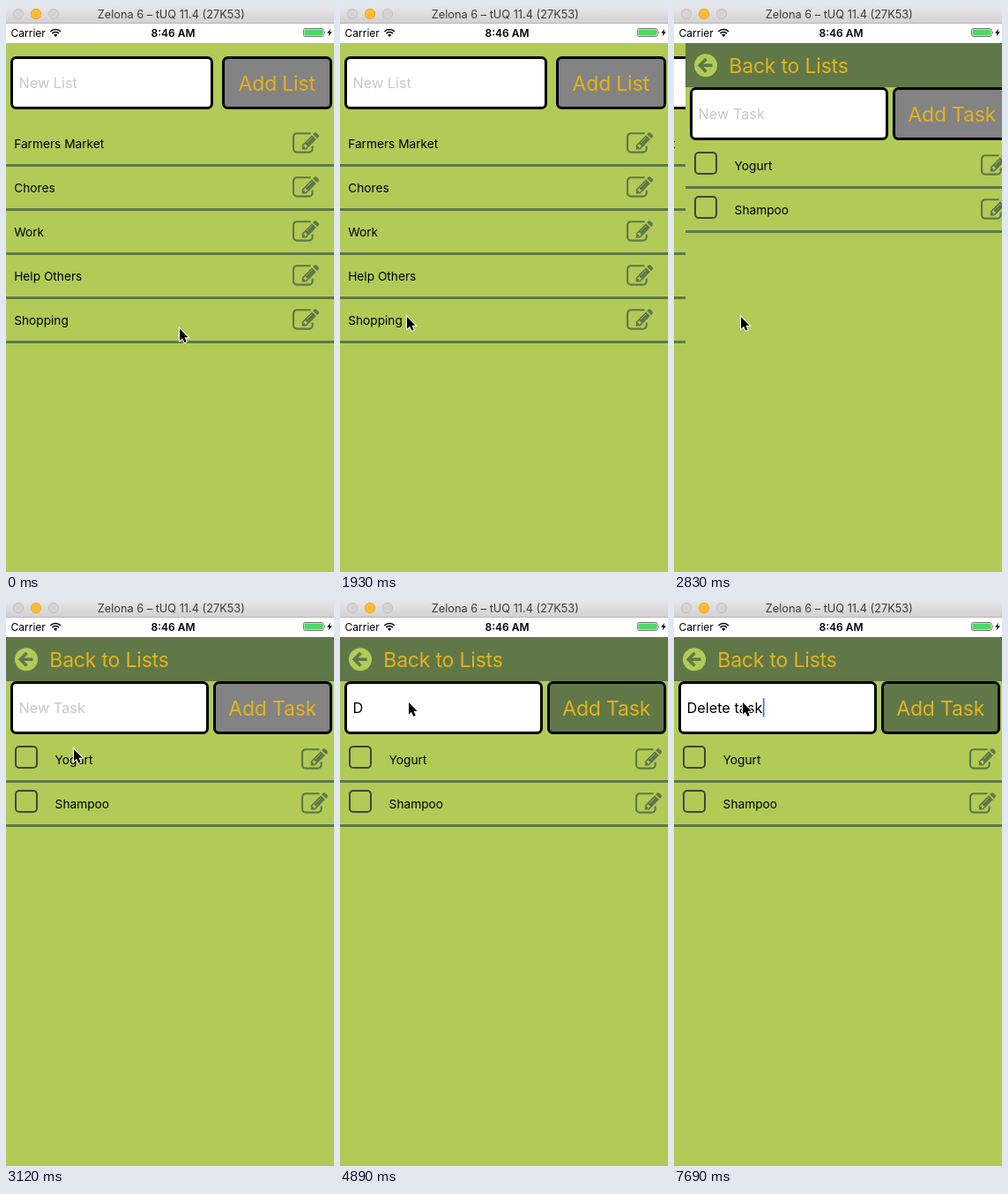
Write an HTML page that moves like this. It is 372 px wide and 641 px high and loops after 8 s.

```html
<!DOCTYPE html>
<html lang="en">
<head>
<meta charset="utf-8">
<title>To-do lists</title>
<style>
  html, body { margin: 0; width: 100%; height: 100%; overflow: hidden; background: #b2cb57; }
  svg { display: block; width: 372px; height: 641px; }
  text { font-family: Inter, Roboto, "Liberation Sans", sans-serif; white-space: pre; }
  .row { font-size: 13.7px; }
  .field { font-size: 16.3px; }
  .hint { fill: #c7c7cd; }
  .big { font-size: 23px; letter-spacing: -.2px; fill: #e3b31c; }
  .box { stroke: #000; stroke-width: 3; }
</style>
</head>
<body>
<svg viewBox="0 0 372 641">
  <defs>
    <linearGradient id="bar" x2="0" y2="1">
      <stop stop-color="#e8e6e8"/><stop offset="1" stop-color="#d2d0d2"/>
    </linearGradient>
    <clipPath id="stage"><rect y="42" width="372" height="599"/></clipPath>
    <g id="edit" fill="#607848">
      <path d="M20.5 1.2H5a4 4 0 0 0-4 4V18.6a4 4 0 0 0 4 4H18.6a4 4 0 0 0 4-4V15.6" fill="none" stroke="#607848" stroke-width="2.15"/>
      <path fill-rule="evenodd" d="M22 3.2L26.9 8.1 15.6 19.4H10.75V14.5ZM14.9 17.7L16.9 15.8 14.3 13.2 12.4 15.2V16.1H14V17.7Z"/>
      <path d="M23.1 2.15L27.95 7 29.5 5.4q.9-1.1 0-2.3L27 .6q-1.1-.9-2.3 0Z"/>
      <path d="M22 6L16 12" stroke="#b2cb57" stroke-width=".7"/>
    </g>
  </defs>
  <rect width="372" height="641" fill="#b2cb57"/>

  <g clip-path="url(#stage)">
    <g id="lists">
      <rect class="box" x="6.5" y="58.5" width="227" height="57" rx="5" fill="#fff"/>
      <text class="field hint" x="14.5" y="92.5">New List</text>
      <rect class="box" x="246.5" y="58.5" width="122" height="57" rx="5" fill="#838383"/>
      <text class="big" x="307.2" y="96" text-anchor="middle">Add List</text>
    </g>
    <g id="tasks">
      <rect y="42" width="372" height="599" fill="#b2cb57"/>
      <rect y="42" width="372" height="50" fill="#607848"/>
      <circle cx="23" cy="67.3" r="13" fill="#b2cb57"/>
      <path d="M23.5 60L16.2 67.3 23.5 74.6M17 67.3H30.5" fill="none" stroke="#607848" stroke-width="3.6"/>
      <text class="big" x="49.3" y="76">Back to Lists</text>
      <rect class="box" x="6.5" y="93.5" width="222" height="57" rx="5" fill="#fff"/>
      <text id="entry" class="field" x="14.5" y="127.5"></text>
      <rect id="caret" y="111" width="1.7" height="21.5" fill="#426bf2"/>
      <rect id="add" class="box" x="236.5" y="93.5" width="132" height="57" rx="5"/>
      <text class="big" x="302.2" y="131" text-anchor="middle">Add Task</text>
    </g>
  </g>

  <rect width="372" height="20" fill="url(#bar)"/>
  <rect y="19" width="372" height="1" fill="#b9b7b9"/>
  <g stroke-width=".8">
    <circle cx="14" cy="9" r="5.7" fill="#d5d3d5" stroke="#bebcbe"/>
    <circle cx="34" cy="9" r="5.7" fill="#ffbd2e" stroke="#e0a028"/>
    <circle cx="54" cy="9" r="5.7" fill="#d5d3d5" stroke="#bebcbe"/>
  </g>
  <text x="187.3" y="14" font-size="12.75" text-anchor="middle" fill="#3c3b3c">Zelona 6 – tUQ 11.4 (27K53)</text>

  <rect y="20" width="372" height="22" fill="#fff"/>
  <text x="5.6" y="34.6" font-size="12">Carrier</text>
  <path d="M50.4 28.9a8 8 0 0 1 11.6 0M52.5 31.1a5.2 5.2 0 0 1 7.4 0" fill="none" stroke="#000" stroke-width="1.5"/>
  <path d="M56.2 35l-2.1-2.2a3 3 0 0 1 4.2 0Z"/>
  <text x="189.5" y="34.6" font-size="12" font-weight="600" text-anchor="middle">8:46 AM</text>
  <rect x="337.5" y="25.5" width="22.5" height="9" rx="1.8" fill="#fff" stroke="#555" stroke-width=".8"/>
  <rect x="338.5" y="26.5" width="20.5" height="7" rx="1" fill="#4cd964"/>
  <path d="M361 28.2q1.8 1.8 0 3.6Z" fill="#555"/>
  <path d="M368 25.8L364.2 30.8H366.6L365.6 34.6 369.8 29.2H367.2Z"/>

  <path id="mouse" d="M0 0V13.5L3.1 10.7 5.4 15.8 7.7 14.8 5.5 9.8H9.6Z" stroke="#fff" stroke-width="2" paint-order="stroke"/>
</svg>
<script>
const $ = id => document.getElementById(id);
const LOOP = 8000, WIDTH = 372, PARALLAX = 114;

// Each key is [start time, value...]; values hold until the next key.
const mouseKeys = [
  [0, 197, 365.5], [1350, 186, 364.5], [1500, 152, 361], [1640, 110, 356],
  [1790, 84, 353], [1930, 76, 352], [2970, 76, 300], [3120, 77, 169],
  [3260, 78, 126], [3410, 78, 116]
];
const slideKeys = [[0, 0], [2680, .684], [2830, .965], [2970, 1]];
const typedKeys = [
  [0, 0], [4740, 1], [5180, 2], [5320, 3], [5470, 4], [5760, 5], [6050, 6],
  [6650, 7], [6800, 8], [7090, 9], [7390, 10], [7690, 11]
];
const caretKeys = [[0, false], [4000, true], [4740, false], [5030, true]];
const buttonKeys = [[0, "#838383"], [4740, "#727e66"], [4890, "#607848"]];

const at = (keys, t) => keys.findLast(key => key[0] <= t).slice(1);

function addRow(screen, label, top, textX, iconX) {
  $(screen).insertAdjacentHTML("beforeend", `
    <text class="row" x="${textX}" y="${top + 28.6}">${label}</text>
    <use href="#edit" x="${iconX}" y="${top + 11}"/>
    <rect y="${top + 47}" width="${WIDTH}" height="3" fill="#607848"/>`);
}

["Farmers Market", "Chores", "Work", "Help Others", "Shopping"].forEach((label, i) =>
  addRow("lists", label, 132 + 50 * i, 9.2, 325));

["Yogurt", "Shampoo"].forEach((label, i) => {
  const top = 157 + 50 * i;
  addRow("tasks", label, top, 55.6, 335);
  $("tasks").insertAdjacentHTML("beforeend",
    `<rect x="11" y="${top + 9}" width="24" height="24" rx="4" fill="none" stroke="#40463a" stroke-width="2"/>`);
});

function render(t) {
  const [x, y] = at(mouseKeys, t);
  const [slide] = at(slideKeys, t);
  const [count] = at(typedKeys, t);
  const [caretOn] = at(caretKeys, t);

  $("mouse").setAttribute("transform", `translate(${x} ${y})`);
  $("lists").setAttribute("transform", `translate(${-PARALLAX * slide} 0)`);
  $("tasks").setAttribute("transform", `translate(${WIDTH * (1 - slide)} 0)`);

  const entry = $("entry");
  entry.textContent = count ? "Delete task".slice(0, count) : "New Task";
  entry.classList.toggle("hint", !count);
  const typedWidth = count ? entry.getComputedTextLength() : 0;
  $("caret").setAttribute("x", 14.8 + typedWidth);
  $("caret").setAttribute("visibility", caretOn ? "visible" : "hidden");
  $("add").setAttribute("fill", at(buttonKeys, t)[0]);
}

const start = performance.now();
function tick() {
  render((performance.now() - start) % LOOP);
  requestAnimationFrame(tick);
}
tick();
</script>
</body>
</html>
```
